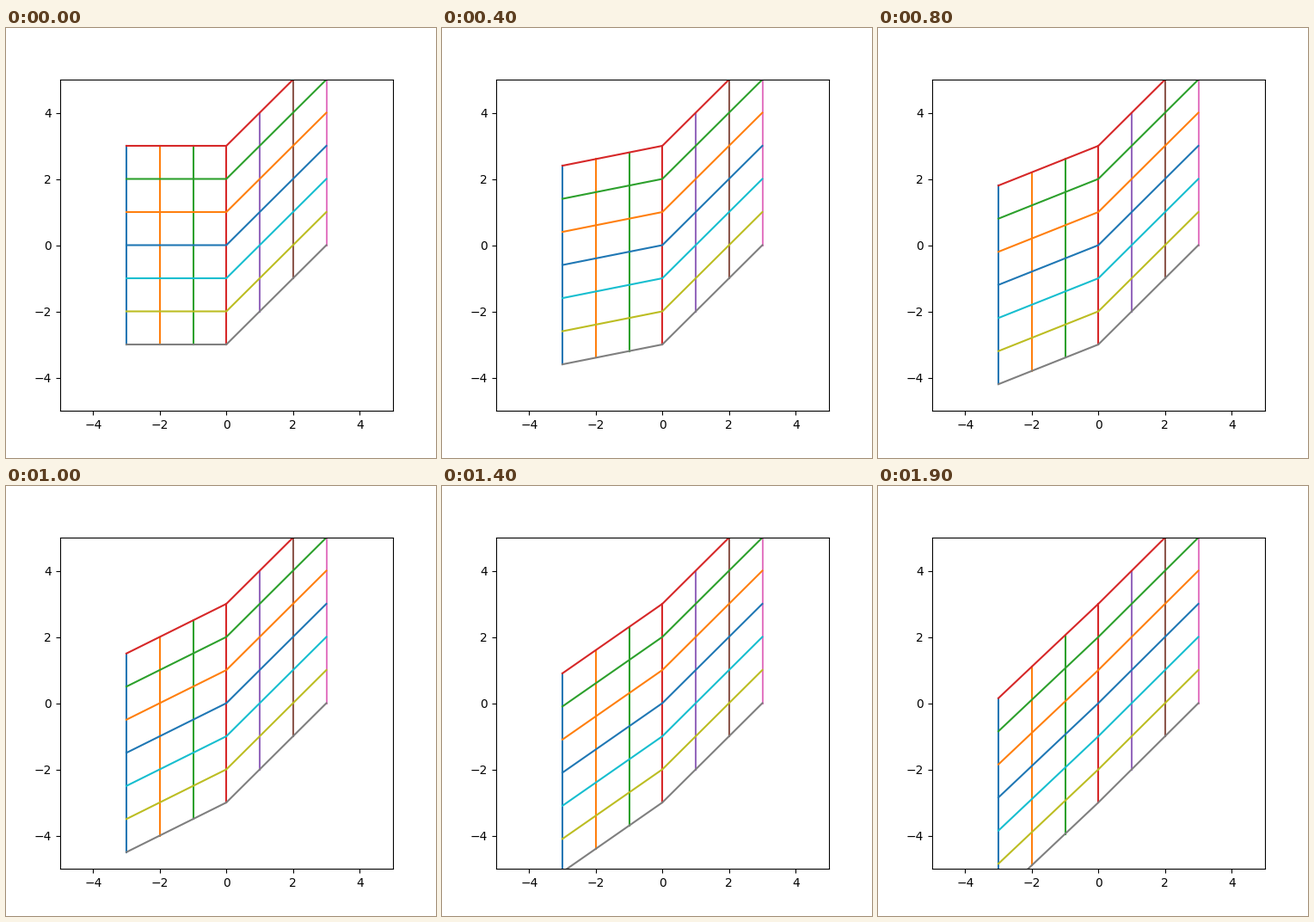
Write a matplotlib script that moves like this. It is 500 px wide and 500 px high and loops after 2000 ms.

```python
import numpy as np
import matplotlib.pyplot as plt
from matplotlib.animation import FuncAnimation

FRAMES = 20
SPAN = np.linspace(-3, 3, 101)

fig, ax = plt.subplots(figsize=(5, 5), dpi=100)
ax.set_xlim(-5, 5)
ax.set_ylim(-5, 5)

# Grid lines: seven vertical, then seven horizontal, in the default colour cycle.
grid = [(np.full_like(SPAN, c), SPAN) for c in range(-3, 4)]
grid += [(SPAN, np.full_like(SPAN, c)) for c in range(-3, 4)]
lines = [ax.plot(x, y)[0] for x, y in grid]


def shear(x, y, slope):
    """Right half is fully sheared, left half by the given slope."""
    return y + np.where(x < 0, slope * x, x)


def draw(frame):
    slope = frame / FRAMES
    for line, (x, y) in zip(lines, grid):
        line.set_data(x, shear(x, y, slope))
    return lines


def init():
    return draw(0)


anim = FuncAnimation(fig, draw, frames=FRAMES, init_func=init,
                     interval=100, repeat=True, repeat_delay=0)
plt.show()
```
